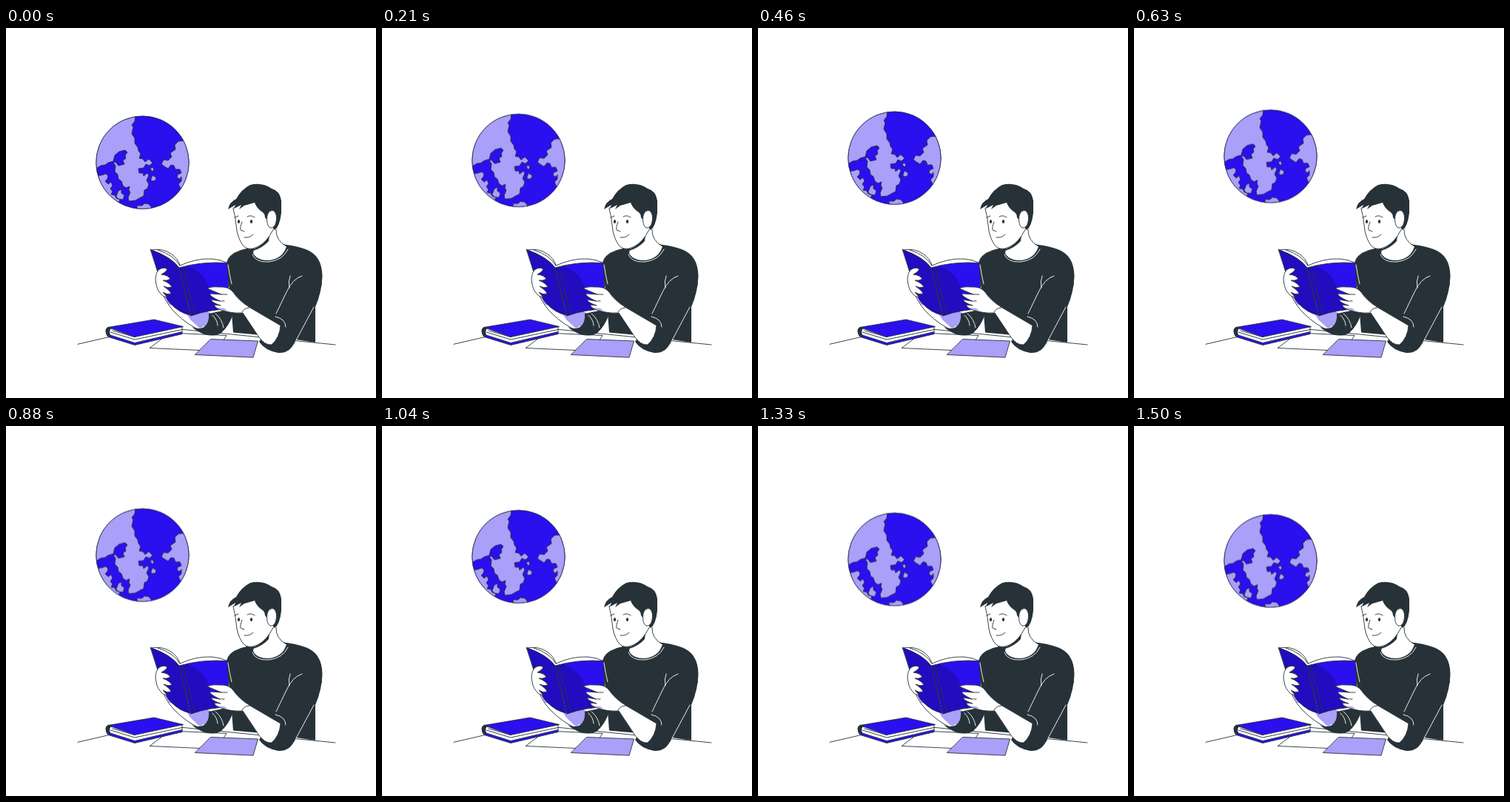
Animation of 500x500 px, one loop 1540 ms. Source, as an HTML page without scripts:

```html
<!DOCTYPE html>
<html lang="en">
<head>
<meta charset="utf-8">
<title>Reading about the world</title>
<style>
  html, body { margin: 0; width: 100%; height: 100%; overflow: hidden; background: #fff; }
  svg { display: block; width: 100%; height: 100%; }
  .ink { fill: #263238; }
  .blue { fill: #2a0fef; }
  .lilac { fill: #aa9ff9; }
  .white { fill: #fff; }
  .shade { fill: #000; opacity: .2; }
  .edge { stroke: #263238; stroke-width: .9; stroke-linejoin: round; stroke-linecap: round; }
  .line { fill: none; }
  .light { fill: none; stroke: #fff; stroke-width: .9; stroke-linecap: round; }
  /* 24 drawings per second: 17 steps up, 19 steps down, one held */
  .globe { animation: float 1540ms -5ms infinite; }
  @keyframes float {
    0% { transform: translateY(0); animation-timing-function: steps(17, end); }
    46% { transform: translateY(-9.45px); animation-timing-function: steps(19, end); }
    97.4%, 100% { transform: translateY(.55px); }
  }
</style>
</head>
<body>
<svg viewBox="0 0 500 500">
  <defs>
    <clipPath id="disc"><circle cx="184.5" cy="181.8" r="63"/></clipPath>
  </defs>

  <g class="globe">
    <circle class="blue" cx="184.5" cy="181.8" r="63"/>
    <g class="lilac edge" clip-path="url(#disc)">
      <path d="M175 116L174 126 170 131 172 134 171 138 170 143 174 149 174 156 178 161 179 166 182 170 180 176 185 177 188 181 193 177 198 182 194 186 189 184 186 189 179 190 180 196 185 196 186 200 191 196 193 199 190 206 193 211 191 217 187 219 186 227 180 230 175 233 166 234 165 229 168 222 166 219 167 214 162 216 158 213 156 207 152 204 151 198 147 194 148 186 145 182 148 181 152 186 160 184 158 179 162 176 161 172 164 168 161 165 153 167 147 172 145 180 138 182 134 185 128 186 118 192V116Z"/>
      <path d="M244 152L233 153 228 158 229 164 222 169 224 174 219 179 213 178 210 184 214 187 219 190 223 185 227 186 229 191 235 191 237 196 232 198 231 202 235 204 237 201 237 207 233 211 236 217 250 220V152Z"/>
      <path d="M119 200L129 199 135 197 138 200 137 204 134 207 138 211 142 208 144 213 141 217 144 221 142 225 147 226 149 230 154 232 150 240 119 230Z"/>
      <path d="M152 220L156 218 156 223 160 226 158 232 152 231 149 228Z"/>
      <path d="M177 240L184 240 187 237 193 238 197 243 190 248 178 246Z"/>
      <path d="M195 190L198 188 200 191 198 194Z"/>
      <path d="M196 204L198 199 203 202 202 206 197 207Z"/>
    </g>
    <circle class="line edge" cx="184.5" cy="181.8" r="62.7"/>
  </g>

  <!-- table, papers and closed book -->
  <path class="line edge" d="M97 427.3L200 403.5 445 428"/>
  <path class="white edge" d="M222 412L298 415.500 284 436.500 194.500 432.500Z"/>
  <path class="lilac edge" d="M277 420.500L340.500 423 334 445.200 255.500 441.500Z"/>
  <g class="edge">
    <path class="blue" d="M138 405Q134 406 135.500 412 136 417 140 418L174 428.500 238 413.500V410L200 400Z"/>
    <path class="white" d="M141 406Q138 411 141 415L174 425.500 238 410.500V404L200 397Z"/>
    <path class="line" d="M141 411L174 421 238 407.500M144 409L174 417.500"/>
    <path class="blue" d="M138 404.500L200 394 239.500 403.500 174 417.500Z"/>
    <path class="ink" d="M138 404.500Q134 406 135.500 412 136 416 140 418 137 410 142 405.500Z"/>
  </g>

  <!-- far arm and body -->
  <path class="ink" d="M335 297Q314 298 303 308 296 315 298 328L303 360 307 411.500 345 415 392 421 418 425V377Q427 356 427.500 335 427 307 405 299 392 294 372 292Z"/>
  <path class="white edge" d="M212 360Q219 376 230 386 246 402 266 410L276 386 238 364Z"/>
  <path class="lilac" d="M215 363L220 374 238 377 249 394 262 406 274 399 275 384 245 380 228 364Z"/>
  <path class="ink" d="M274 386L302 380 307 386Q302 402 291 412 282 418 268 414 258 410 251 404 261 408 268 404 275 398 274 386Z"/>
  <path class="light" d="M283 386Q292 393 294 405M279 388Q286 395 286 402"/>

  <!-- open book -->
  <path class="white edge" d="M196 300Q211 297 223 305 233 312 235 321 257 311 278 312 290 313 298 317L294 330 238 340Z"/>
  <path class="line edge" d="M205 300Q226 306 235 321"/>
  <path class="blue edge" d="M195.500 299.500Q223 309 234 324L249 388Q234 385 222 372 215 365 213 355Z"/>
  <path class="shade" d="M195.500 299.500Q223 309 234 324L249 388Q234 385 222 372 215 365 213 355Z"/>
  <path class="blue edge" d="M234 324Q265 315 299 317.500L302 380Q275 380 250 389Z"/>
  <path class="shade" d="M234 324L246 322Q266 331 272 345 276 359 285 367L301 378Q275 380 250 389Z"/>
  <path class="line edge" d="M239 323L255 387M236 333L241 331M244 362L249 360"/>
  <path class="light" d="M300 320Q302 334 305 346"/>

  <!-- far hand -->
  <path class="white edge" d="M212 362Q204 355 203 346 200 335 206 327 213 322 218 326 216 330 210 333 219 334 222 339 218 342 212 341 222 345 224 350 219 352 213 349 222 355 223 359 218 361 212 357L218 364Z"/>

  <!-- near arm -->
  <path class="ink" d="M417 377L427 345 395 330 366 385 342 424Q350 436 368 439 383 440 390 425Z"/>
  <path class="white edge" d="M272 352Q277 349 288 350 301 349 307 357 314 368 330 378L371 402Q370 418 359 428 350 429 342 418L320 385Q304 386 291 381 281 378 282 374L290 375Q278 371 277 367L289 369Q274 362 276 359L291 360Q279 355 272 352Z"/>
  <path class="lilac" d="M285 378L300 383 295 379Z"/>
  <path class="line edge" d="M291 360L299 360M289 369L295 369M319 384Q322 378 329 378"/>
  <path class="ink" d="M369 394Q378 393 379 402 376 416 359 428L351 430 368 439 390 426 395 400 385 385Z"/>
  <path class="light" d="M400 335Q387 339 379 357L365 386M384 335Q381 343 383 351M416 377L392 422M364 390Q378 393 378 404"/>

  <!-- neck and head -->
  <path class="white" d="M335 298L355 274H366Q364 288 379 295 374 312 355 314 338 314 334 304Z"/>
  <path class="line edge" d="M365 272Q364 287 379 295"/>
  <path class="light" d="M333 306Q337 317 355 316 374 314 381 299"/>
  <path class="white edge" d="M307 244Q310 255 311 266 312 281 319 292 324 300 334 298 348 294 356 281L365 266 360 240 335 230Z"/>
  <path class="ink" d="M334 299Q347 294 356 281L355 288Q347 297 334 301Z"/>
  <path class="ink" d="M300 245Q302 235 311 231 318 218 330 212 346 208 359 217 370 220 372 233L372 250Q370 268 363 273L360 269 350 256Q350 250 344 247 338 242 336 236L322 240 315 245 318 239 308 244 310 239Z"/>
  <path class="white edge" d="M353 253Q356 245 362 247 367 252 365 262 363 271 357 270 351 266 353 253Z"/>
  <g class="ink">
    <ellipse cx="314.500" cy="261.500" rx="1.600" ry="2.500"/>
    <ellipse cx="331.500" cy="261.500" rx="1.600" ry="2.500"/>
  </g>
  <path class="line edge" d="M309 256L314 254M326 255Q331 252 336 256M319 262Q316 270 317 273L322 275M322 283Q329 284 334 279"/>
</svg>
</body>
</html>
```
